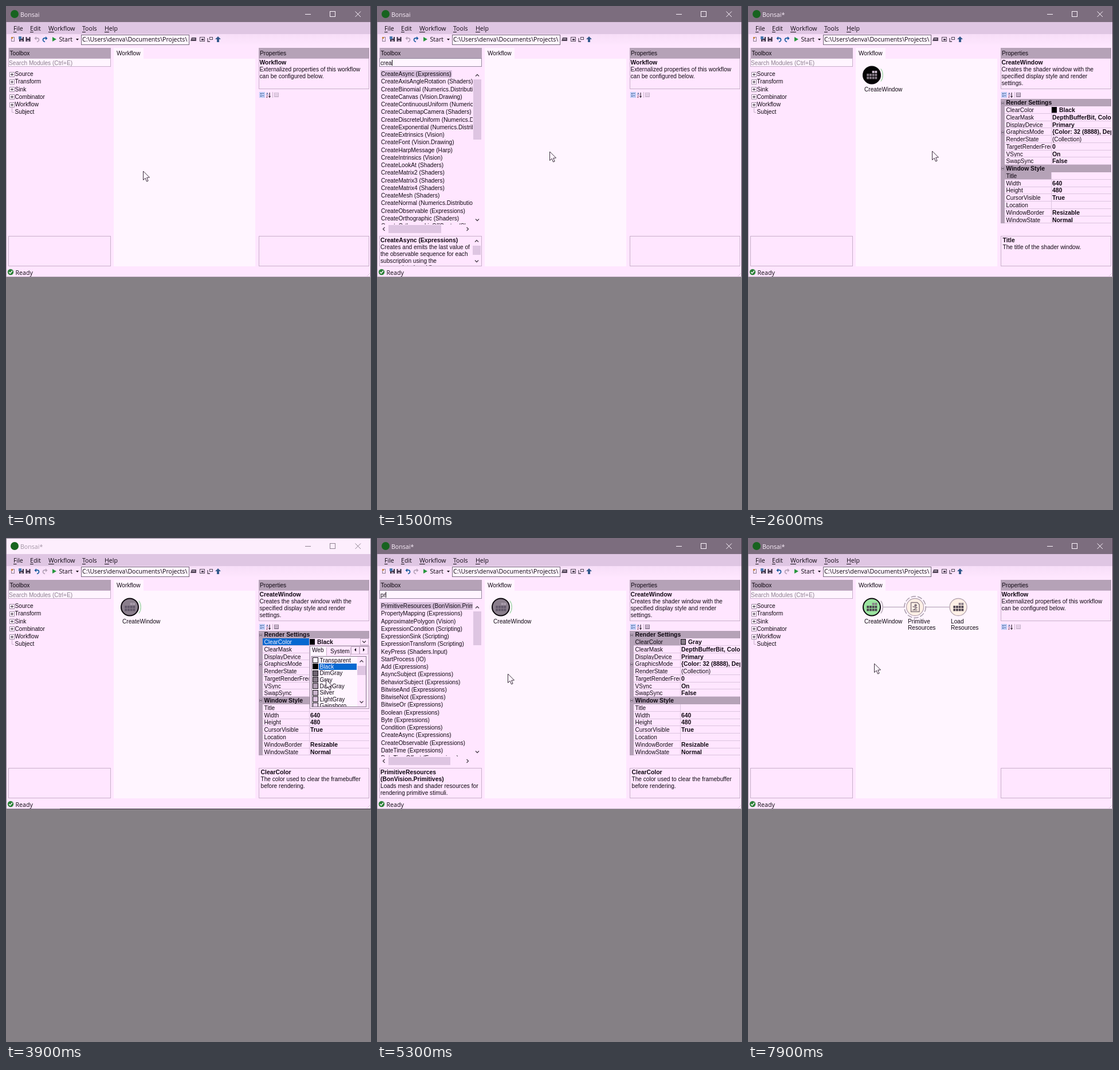
Recreate the animation shown at these times as an HTML page with a canvas. Size 637 by 879 pixels, loop 8 s.

```html
<!DOCTYPE html>
<html lang="en">
<head>
<meta charset="utf-8">
<title>Bonsai workflow</title>
<style>
html, body { margin: 0; width: 100%; height: 100%; overflow: hidden; background: #858085; }
canvas { display: block; width: 637px; height: 879px; }
</style>
</head>
<body>
<canvas id="stage" width="637" height="879"></canvas>
<script>
const ctx = document.getElementById('stage').getContext('2d');
const LOOP = 8000;
const INK = '#100812', BODY = '#ffe6ff', PAGE = '#fff5ff', HEAD = '#b5a2b7';
const EDGE = '#c8b0ca', BAR = '#dec5e2', BLUE = '#0668d0', GRAY = '#857a87';
const SANS = '10.15px "Liberation Sans", Arial, sans-serif';
const BOLD = 'bold 10.4px "Liberation Sans", Arial, sans-serif';
const UI = '10.6px "Open Sans", "Noto Sans", sans-serif';

// ---- drawing helpers ----
function rect(x, y, w, h, fill) { ctx.fillStyle = fill; ctx.fillRect(x, y, w, h); }
function frame(x, y, w, h, color) {
  ctx.strokeStyle = color; ctx.lineWidth = 1;
  ctx.strokeRect(x + .5, y + .5, w - 1, h - 1);
}
function text(s, x, y, font = SANS, color = INK) {
  ctx.font = font; ctx.fillStyle = color; ctx.fillText(s, x, y);
}
function path(points, color, width = 1, fill) {
  ctx.beginPath();
  points.forEach(([x, y], i) => i ? ctx.lineTo(x, y) : ctx.moveTo(x, y));
  if (fill) { ctx.closePath(); ctx.fillStyle = fill; ctx.fill(); }
  if (color) { ctx.strokeStyle = color; ctx.lineWidth = width; ctx.stroke(); }
}
function arc(x, y, r, from, to, color, width = 1) {
  ctx.beginPath(); ctx.arc(x, y, r, from, to);
  ctx.strokeStyle = color; ctx.lineWidth = width; ctx.stroke();
}
function disc(x, y, r, fill) {
  ctx.beginPath(); ctx.arc(x, y, r, 0, 7); ctx.fillStyle = fill; ctx.fill();
}
function clipped(x, y, w, h, draw) {
  ctx.save(); ctx.beginPath(); ctx.rect(x, y, w, h); ctx.clip(); draw(); ctx.restore();
}
function chevron(x, y, dx, dy, color = '#4b404d') {
  path([[x - 3 * dy - 1.5 * dx, y - 3 * dx - 1.5 * dy], [x + 1.5 * dx, y + 1.5 * dy],
        [x + 3 * dy - 1.5 * dx, y + 3 * dx - 1.5 * dy]], color, 1.3);
}

// ---- script of the session ----
const LISTS = {
  crea: {
    rows: 'CreateAsync (Expressions)|CreateAxisAngleRotation (Shaders)|CreateBinomial (Numerics.Distributions)|CreateCanvas (Vision.Drawing)|CreateContinuousUniform (Numerics.Distributions)|CreateCubemapCamera (Shaders)|CreateDiscreteUniform (Numerics.Distributions)|CreateExponential (Numerics.Distributions)|CreateExtrinsics (Vision)|CreateFont (Vision.Drawing)|CreateHarpMessage (Harp)|CreateIntrinsics (Vision)|CreateLookAt (Shaders)|CreateMatrix2 (Shaders)|CreateMatrix3 (Shaders)|CreateMatrix4 (Shaders)|CreateMesh (Shaders)|CreateNormal (Numerics.Distributions)|CreateObservable (Expressions)|CreateOrthographic (Shaders)|CreateOrthographicOffCenter (Shaders)',
    v: 233, h: 112, scroll: true,
    help: ['CreateAsync (Expressions)', '', 'Creates and emits the last value of', 'the observable sequence for each', 'subscription using the', 'encapsulated workflow.']
  },
  window: {
    rows: 'CreateWindow (Shaders)',
    help: ['CreateWindow (Shaders)', '', 'Creates the shader window with the', 'specified display style and render', 'settings.']
  },
  pr: {
    rows: 'PrimitiveResources (BonVision.Primitives)|PropertyMapping (Expressions)|ApproximatePolygon (Vision)|ExpressionCondition (Scripting)|ExpressionSink (Scripting)|ExpressionTransform (Scripting)|KeyPress (Shaders.Input)|StartProcess (IO)|Add (Expressions)|AsyncSubject (Expressions)|BehaviorSubject (Expressions)|BitwiseAnd (Expressions)|BitwiseNot (Expressions)|BitwiseOr (Expressions)|Boolean (Expressions)|Byte (Expressions)|Condition (Expressions)|CreateAsync (Expressions)|CreateObservable (Expressions)|DateTime (Expressions)|DateTimeOffset (Expressions)',
    v: 187, h: 128,
    help: ['PrimitiveResources', '(BonVision.Primitives)', 'Loads mesh and shader resources for', 'rendering primitive stimuli.']
  },
  lo: {
    rows: 'LoadImage (Shaders)|LoadImage (Vision)|LoadIntrinsics (Vision)|LoadResources (Shaders)|Log (Numerics)|Log (Dsp)|Log10 (Numerics)|LogEvent (BonVision.Logging)|LogicalAnd (Expressions)|LogicalOr (Expressions)|LogPolar (Vision)|Float (Expressions)|Floor (Numerics)|ColorBalance (Vision)|ColorFrameSource (Kinect)|ColorStream (RealSense)|AnalogInput (Arduino)|AnalogOutput (Arduino)|EventLogger (BonVision.Logging)|WorkflowInput (Expressions)|WorkflowOutput (Expressions)',
    v: 267, h: 118,
    help: ['LoadImage (Shaders)', '', 'Loads a texture buffer from the', 'specified file.']
  },
  load: {
    rows: 'LoadResources (Shaders)',
    help: ['LoadResources (Shaders)', '', 'Loads a collection of shader', 'resources.']
  }
};
LISTS.prim = { rows: 'PrimitiveResources (BonVision.Primitives)', h: 128, help: LISTS.pr.help };

// [time, typed text, list]
const TYPING = [
  [0, ''], [1200, 'c', 'crea'], [1300, 'cr', 'crea'], [1400, 'cre', 'crea'], [1500, 'crea', 'crea'],
  [1600, 'creat', 'crea'], [1700, 'create', 'crea'], [1900, 'createw', 'window'], [2200, ''],
  [5300, 'pr', 'pr'], [5400, 'pri', 'pr'], [5500, 'prim', 'prim'], [6000, ''],
  [6500, 'lo', 'lo'], [6600, 'loa', 'lo'], [6700, 'load', 'lo'], [6800, 'loadr', 'load'], [7100, '']
];
// [time, x, y] of the pointer tip
const POINTER = [
  [0, 239, 288], [300, 239, 288], [900, 301, 254], [2100, 301, 254], [2500, 321, 253], [2700, 321, 253],
  [3200, 623, 178], [3500, 623, 178], [3800, 558, 247], [4200, 558, 247], [5000, 228, 237],
  [7600, 228, 237], [7800, 220, 219], [8000, 220, 219]
];
// [time, panel, selected row]
const PANELS = [
  [0, 'workflow'], [2200, 'window', 'Title'], [3200, 'window', 'ClearColor'],
  [6000, 'primitive', 'Path'], [7100, 'load', 'Resources'], [7700, 'workflow']
];

const GRIDS = {
  window: ['#Render Settings', 'ClearColor|', 'ClearMask|DepthBufferBit, ColorBufferBit', 'DisplayDevice|Primary',
    'GraphicsMode|{Color: 32 (8888), Depth: 24}', 'RenderState|~(Collection)', 'TargetRenderFrequency|0', 'VSync|On',
    'SwapSync|False', '#Window Style', 'Title|', 'Width|640', 'Height|480', 'CursorVisible|True', 'Location|',
    'WindowBorder|Resizable', 'WindowState|Normal'],
  primitive: ['#Design', 'Path|BonVision:Primitives'],
  load: ['#Misc', 'Resources|~(Collection)']
};
const ABOUT = {
  workflow: ['Workflow', 'Externalized properties of this workflow', 'can be configured below.'],
  window: ['CreateWindow', 'Creates the shader window with the', 'specified display style and render', 'settings.'],
  primitive: ['PrimitiveResources (IncludeWorkflow)', 'Loads mesh and shader resources for', 'rendering primitive stimuli.'],
  load: ['LoadResources', 'Loads a collection of shader', 'resources.']
};
const HINTS = {
  Title: ['Title', 'The title of the shader window.'],
  ClearColor: ['ClearColor', 'The color used to clear the framebuffer', 'before rendering.'],
  Path: ['Path', 'The path of the workflow to include.'],
  Resources: ['Resources', 'The collection of resources to load.']
};

function stepAt(steps, t) { return steps.filter(s => s[0] <= t).pop(); }
function pointerAt(t) {
  const i = POINTER.findIndex(p => p[0] > t);
  const [t0, x0, y0] = POINTER[i - 1], [t1, x1, y1] = POINTER[i];
  const u = (t - t0) / (t1 - t0), k = u * u * (3 - 2 * u);
  return [x0 + (x1 - x0) * k, y0 + (y1 - y0) * k];
}

// ---- window parts ----
function header(label, x, w) {
  rect(x, 73, w, 18, HEAD);
  text(label, x + 2, 86);
}
function paragraph(lines, x, y, bolds = 1) {
  lines.forEach((s, i) => text(s, x, y + i * 12, i < bolds ? BOLD : SANS));
}

function titleBar(t, open) {
  rect(0, 0, 637, 28, open ? '#fdeefd' : '#7c6d7e');
  disc(15, 14, 7, '#17631f');
  text(t < 2200 ? 'Bonsai' : 'Bonsai*', 25, 18.5, UI, open ? '#a294a4' : '#fbeefb');
  const c = open ? '#8f8291' : '#fff5ff';
  rect(522, 14, 10, 1, c);
  frame(565, 9, 10, 10, c);
  path([[609.5, 9.5], [619, 19]], c);
  path([[619, 9.5], [609.5, 19]], c);
}

function menuBar() {
  rect(0, 28, 637, 21, '#dfc6e3');
  [['File', 13], ['Edit', 42], ['Workflow', 74], ['Tools', 133], ['Help', 172]].forEach(([s, x]) => {
    text(s, x, 43, UI);
    rect(x, 45, ctx.measureText(s[0]).width, 1, INK);
  });
}

function floppy(x) {
  rect(x - 4, 54, 8, 8, '#352c40');
  rect(x - 2, 54, 4, 3, '#e8d2ea');
  rect(x - 2, 59, 4, 3, '#a896ac');
}
// curved arrow; dir -1 points left, 1 points right
function turn(x, dir, on) {
  const c = on ? '#17599e' : '#b3a0b7';
  ctx.save();
  ctx.translate(x, 58); ctx.scale(dir, 1);
  ctx.beginPath();
  ctx.moveTo(2, -2); ctx.bezierCurveTo(-5, -3, -5, 3, 0, 4.5);
  ctx.strokeStyle = c; ctx.lineWidth = 1.6; ctx.stroke();
  path([[1, -5], [4.5, -1.5], [1, 1.5]], null, 1, c);
  ctx.restore();
}
function toolBar(t) {
  const g = ctx.createLinearGradient(0, 49, 0, 68);
  g.addColorStop(0, '#f7def8'); g.addColorStop(1, '#fee6fe');
  rect(0, 49, 637, 19, g);
  frame(9, 54, 6, 8, '#8b7b90'); rect(9, 54, 3, 3, '#c8873f');
  floppy(27); rect(22, 53, 5, 5, '#4777ac'); floppy(38.5);
  turn(54, -1, t >= 2200);
  turn(68, 1, t < 2800);
  path([[81, 54], [88, 58], [81, 62]], null, 1, '#26963c');
  text('Start', 92.5, 62, UI);
  path([[122, 57], [127, 57], [124.5, 60]], null, 1, INK);
  rect(131, 50, 189, 18, PAGE); frame(131, 50, 189, 18, '#74677a');
  clipped(132, 51, 187, 16, () => text('C:\\Users\\denva\\Documents\\Projects\\', 133, 62, UI));
  path([[322, 61], [324, 55], [332, 55], [332, 61]], null, 1, '#54485a');
  rect(325, 57, 5, 1, '#f0daf2');
  frame(338, 54, 9, 8, '#54485a'); rect(341, 57, 4, 3, '#54485a');
  frame(355, 54, 6, 5, '#54485a'); path([[352, 56], [352, 62], [356, 62]], '#54485a', 1.3);
  path([[365, 58], [370, 53], [375, 58], [372, 58], [372, 63], [368, 63], [368, 58]], null, 1, '#345a8c');
}

function tree() {
  ['Source', 'Transform', 'Sink', 'Combinator', 'Workflow', 'Subject'].forEach((s, i) => {
    const y = 118.7 + i * 13.25, r = Math.round(y);
    text(s, 15.5, y + 3.5);
    if (i === 5) {
      path([[10.5, r - 8], [10.5, r + .5], [14, r + .5]], EDGE);
      return;
    }
    rect(6, r - 4, 8, 8, PAGE);
    frame(6, r - 4, 9, 9, '#a392a7');
    rect(8, r, 5, 1, '#3b303e'); rect(10, r - 2, 1, 5, '#3b303e');
  });
}

function results(list) {
  const rows = list.rows.split('|'), right = rows.length > 20 ? 167 : 182;
  clipped(5, 109, right - 5, 272, () => {
    ctx.font = SANS;
    rect(6, 112, ctx.measureText(rows[0]).width + 2, 13, '#d7bfdc');
    rows.forEach((s, i) => text(s, 7, 122.2 + i * 13.25));
  });
  if (list.v) {
    rect(168, 128, 14, list.v - 128, BAR);
    chevron(175, 121, 0, -1); chevron(175, 373, 0, 1);
  }
  if (list.h) {
    rect(20, 382, list.h - 20, 14, BAR);
    chevron(12, 389, -1, 0); chevron(158, 389, 1, 0);
  }
  clipped(5, 402, 177, 51, () => {
    paragraph(list.help.filter(Boolean), 6, 411.5, list.help[1] ? 2 : 1);
  });
  if (list.scroll) {
    rect(167, 418, 14, 16, BAR);
    chevron(174, 410, 0, -1); chevron(174, 445, 0, 1);
  }
}

function toolbox(typed, list) {
  header('Toolbox', 4.5, 178.5);
  rect(4, 91, 179, 15, PAGE);
  frame(4, 91, 179, 15, list ? '#95889f' : EDGE);
  frame(4, 401, 179, 53, EDGE);
  if (!list) {
    text('Search Modules (Ctrl+E)', 5, 102.5, SANS, '#8c7e8f');
    tree();
    return;
  }
  text(typed, 6, 102.5);
  rect(Math.round(6 + ctx.measureText(typed).width), 94, 1, 10, INK);
  results(LISTS[list]);
}

// ---- workflow graph ----
function blocks(x, y, low, high) {
  for (let r = 0; r < 3; r++) for (let c = r ? 0 : 2; c < 4; c++) {
    rect(x - 8.7 + c * 4.7, y - 7.5 + r * 5.2, 3.8, 4, r ? low : high);
  }
}
function sheet(x, y, color) {
  path([[x - 7, y - 8], [x + 4, y - 8], [x + 7.5, y - 4.5], [x + 7.5, y + 8], [x - 7, y + 8], [x - 7, y - 8]], color, 1.4);
  disc(x + 1, y - 3, 2.2, color);
  path([[x - 4, y - 1], [x + 3, y + 1], [x - 3, y + 5], [x + 4, y + 5]], color, 1.5);
}
function node(x, kind, selected, focus, ring) {
  const y = 120.5, base = kind === 'window' ? '#9be3a0' : '#fff0e6';
  disc(x, y, 15.5, selected ? (focus ? '#050305' : '#8a7e8c') : base);
  arc(x, y, 15, 0, 7, selected || ring ? '#0c070d' : '#b4a4b2', selected || ring ? 2 : 1.3);
  if (kind === 'primitive') {
    ctx.setLineDash([8.5, 3]);
    arc(x, y, 18.7, 0, 7, '#a799aa', 1.5);
    ctx.setLineDash([]);
    sheet(x, y, selected ? '#6a5f6d' : '#80737c');
  } else if (selected) {
    blocks(x, y, focus ? '#857a87' : '#62576a', focus ? '#cdbed0' : '#aa9dad');
  } else blocks(x, y, '#4a404d', '#8a7f8a');
  if (kind === 'window') arc(x, y, 19.3, -.6, .6, selected ? '#aedbb5' : '#bdb0bd', 1.6);
}
function label(lines, x) { lines.forEach((s, i) => text(s, x, 148.7 + i * 11.4)); }
function wire(from, to) { path([[from, 120.5], [to, 120.5]], '#c2b3c5', 1.7); }

function workflow(t, panel, focus) {
  rect(188, 92, 247, 362, PAGE);
  rect(188, 73, 52, 20, PAGE);
  text('Workflow', 193, 86);
  if (t < 2200) return;
  if (t >= 6000) wire(235, 273);
  if (t >= 7100) wire(310, 352);
  node(216, 'window', panel === 'window', focus, panel === 'workflow');
  label(['CreateWindow'], 203);
  if (t >= 6000) {
    node(291.5, 'primitive', panel === 'primitive', focus);
    label(['Primitive', 'Resources'], 279);
  }
  if (t >= 7100) {
    node(367, 'load', panel === 'load', focus);
    label(['Load', 'Resources'], 354);
  }
}

// ---- property panel ----
function colorValue(name, y) {
  rect(530, y - 5, 9, 10, name === 'Black' ? '#000' : GRAY);
  frame(530, Math.round(y - 5), 9, 10, INK);
  text(name, 543, y + 3.7, BOLD);
}
function grid(rows, picked, active, t) {
  const pitch = 12.77;
  rect(441, 162, 7, rows.length * pitch, HEAD);
  rows.forEach((row, i) => {
    const y = 168.5 + i * pitch, top = Math.round(y - 6.4);
    if (row[0] === '#') {
      rect(441, top, 193, 13, HEAD);
      text(row.slice(1), 450.5, y + 3.7, BOLD);
    } else {
      const [name, value] = row.split('|'), on = name === picked;
      if (on) rect(448, top, 81, 13, active ? BLUE : HEAD);
      clipped(448, top, 80.5, 13, () => text(name, 450.5, y + 3.7, SANS, on && active ? PAGE : INK));
      rect(448, top + 12, 186, 1, '#dcc4df');
      rect(529, top, 1, 13, '#dcc4df');
      clipped(530, top, 104, 13, () => {
        if (name === 'ClearColor') colorValue(t < 4100 ? 'Black' : 'Gray', y);
        else if (value[0] === '~') text(value.slice(1), 531, y + 3.7);
        else text(value, 531, y + 3.7, BOLD);
      });
    }
    if (row[0] === '#' || row.startsWith('GraphicsMode')) {
      rect(442, Math.round(y) - 2, 5, 5, '#f4dff6');
      frame(442, Math.round(y) - 2, 5, 5, '#8b7a8f');
      rect(443, Math.round(y), 3, 1, INK);
    }
  });
}

function properties(panel, picked, active, t) {
  header('Properties', 441, 193);
  frame(441, 91, 193, 54, EDGE);
  clipped(442, 92, 191, 52, () => paragraph(ABOUT[panel], 442.5, 102));
  rect(442, 150, 10, 10, '#bcc9f4');
  [152, 156].forEach(y => { rect(444, y, 2, 2, '#5d76a6'); rect(447, y, 3, 1, '#5d76a6'); });
  text('A', 454, 155, 'bold 5px "Liberation Sans", sans-serif', '#2d4c88');
  text('Z', 454, 160, 'bold 5px "Liberation Sans", sans-serif', '#743550');
  path([[460, 151], [460, 159]], INK);
  path([[458.5, 157], [460, 159.5], [461.5, 157]], INK);
  rect(465, 150, 1, 10, EDGE);
  const dim = panel === 'window' ? '#8c7b92' : '#c9b6cd';
  frame(468, 151, 8, 8, dim);
  [153, 155, 157].forEach(y => rect(469, y, 6, 1, dim));
  if (GRIDS[panel]) grid(GRIDS[panel], picked, active, t);
  frame(441, 401, 193, 53, EDGE);
  paragraph(HINTS[picked] || [], 444.5, 412);
}

function dropdown() {
  frame(618, 175, 15, 12, EDGE);
  chevron(625, 181, 0, 1);
  rect(530, 188, 104, 110, BODY); frame(530, 188, 104, 110, '#a393a6');
  rect(531, 189, 28, 17, PAGE);
  text('Web', 534, 199);
  text('System', 566, 201);
  rect(559, 191, 1, 14, EDGE); rect(601, 191, 1, 14, EDGE);
  frame(602, 189, 15, 14, EDGE); frame(617, 189, 15, 14, EDGE);
  path([[611, 192], [608, 195], [611, 198]], null, 1, INK);
  path([[623, 192], [626, 195], [623, 198]], null, 1, INK);
  rect(533, 207, 96, 87, PAGE); frame(533, 206, 96, 89, '#84758a');
  const names = ['Transparent', 'Black', 'DimGray', 'Gray', 'DarkGray', 'Silver', 'LightGray', 'Gainsboro'];
  const tones = [PAGE, '#000', '#6d636f', GRAY, '#b09eb2', '#c8b4cb', '#dac3dd', '#e4cee7'];
  clipped(534, 207, 94, 87, () => names.forEach((s, i) => {
    const y = 213 + i * 11.35, top = Math.round(y - 5);
    if (i === 1) rect(546, 219, 66, 11, BLUE);
    rect(535, top, 10, 10, tones[i]);
    frame(535, top, 10, 10, INK);
    text(s, 547.5, y + 3.6, SANS, i === 1 ? PAGE : INK);
  }));
  rect(613, 207, 15, 87, BODY);
  rect(613, 223, 15, 16, BAR);
  chevron(620.5, 215, 0, -1); chevron(620.5, 286, 0, 1);
}

function statusBar() {
  disc(8, 464, 5.2, '#2c8138');
  path([[5.2, 464], [7.3, 466.2], [11, 461.8]], '#fff5ff', 1.5);
  text('Ready', 16.5, 469, UI);
  for (let i = 0; i < 3; i++) rect(634 - i * 2, 466 + i * 2, 1, 1, EDGE);
}

function border(open) {
  if (open) {
    frame(0, 0, 637, 473, '#85778a');
    rect(94, 472, 543, 1, '#433746');
    return;
  }
  rect(0, 28, 1, 445, '#a999ac');
  rect(636, 0, 1, 473, '#433746');
  rect(0, 472, 637, 1, '#a292a5');
}

function pointer([x, y]) {
  path([[0, 0], [0, 15.5], [3.6, 12.2], [6, 18], [8.6, 17], [6.2, 11.3], [11, 11], [0, 0]].map(([a, b]) => [x + .5 + a, y + b]),
    '#3a2f3c', 1, '#fff5ff');
}

function draw(t) {
  const [, typed, list] = stepAt(TYPING, t);
  const [, panel, picked] = stepAt(PANELS, t);
  const open = t >= 3400 && t < 4100;
  const gridFocus = t >= 3200 && t < 5000;
  const searchFocus = list || (t >= 5000 && t < 5300);

  rect(0, 0, 637, 879, '#858085');
  rect(0, 0, 637, 473, BODY);
  titleBar(t, open);
  menuBar();
  toolBar(t);
  toolbox(typed, list);
  workflow(t, panel, !gridFocus && !searchFocus);
  properties(panel, picked, gridFocus, t);
  statusBar();
  border(open);
  if (open) dropdown();
  pointer(pointerAt(t));
}

const start = performance.now();
function tick() {
  draw((performance.now() - start) % LOOP);
  requestAnimationFrame(tick);
}
tick();
</script>
</body>
</html>
```
